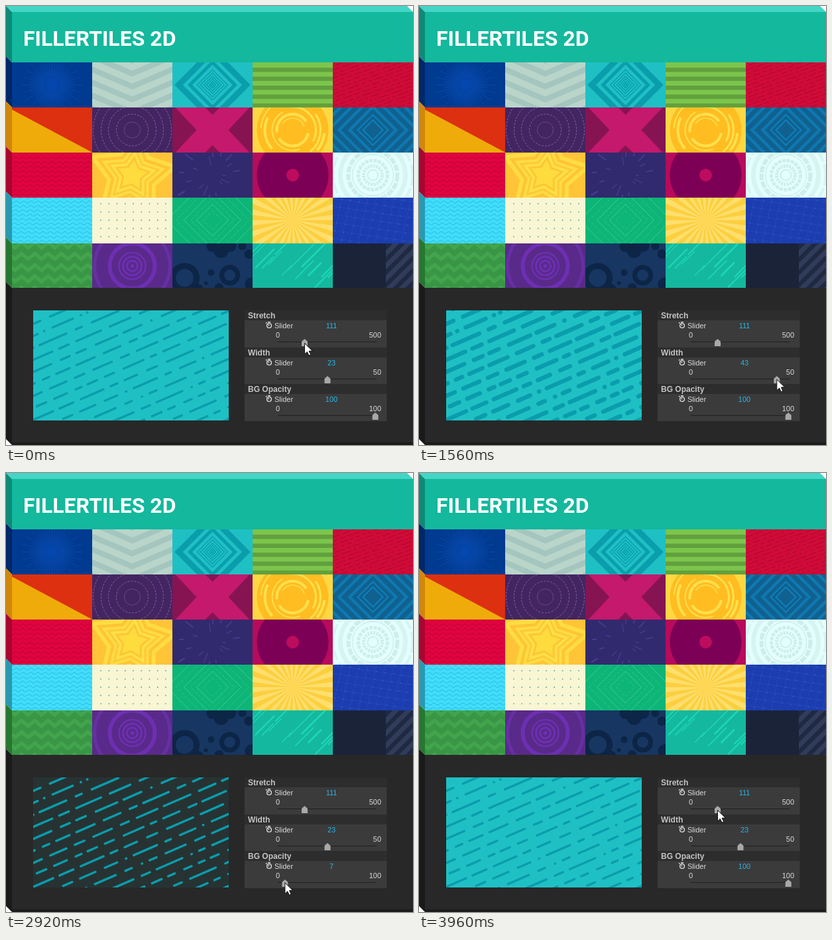
Animation, 614 px wide and 662 px high, one loop 4 s. Source, as an HTML page with a canvas:

```html
<!DOCTYPE html>
<html lang="en">
<head>
<meta charset="utf-8">
<title>Fillertiles 2D</title>
<style>
html, body { margin: 0; width: 100%; height: 100%; overflow: hidden; background: #fff; }
canvas { display: block; }
</style>
</head>
<body>
<canvas id="stage" width="614" height="662"></canvas>
<script>
const W = 614, H = 662, LOOP = 4000, STEP = 40, TAU = Math.PI * 2;
const ctx = document.getElementById('stage').getContext('2d');
const backdrop = document.createElement('canvas');
backdrop.width = W;
backdrop.height = H;
const g = backdrop.getContext('2d');
const SANS = '"Liberation Sans", Arial, sans-serif';

function rng(seed) {
  return () => {
    seed = (seed * 1664525 + 1013904223) >>> 0;
    return seed / 4294967296;
  };
}

// ---------- shape helpers ----------
function poly(c, pts, fill) {
  c.beginPath();
  pts.forEach(p => c.lineTo(p[0], p[1]));
  c.closePath();
  c.fillStyle = fill;
  c.fill();
}
function line(x1, y1, x2, y2, color, w = 1) {
  g.beginPath();
  g.moveTo(x1, y1);
  g.lineTo(x2, y2);
  g.strokeStyle = color;
  g.lineWidth = w;
  g.stroke();
}
function ring(r, w, color, a = 0, b = TAU, dash = []) {
  g.beginPath();
  g.arc(0, 0, r, a, b);
  g.setLineDash(dash);
  g.strokeStyle = color;
  g.lineWidth = w;
  g.stroke();
  g.setLineDash([]);
}
function disc(x, y, r, color) {
  g.beginPath();
  g.arc(x, y, r, 0, TAU);
  g.fillStyle = color;
  g.fill();
}
function diamond(r, w, color, dash = []) {
  g.beginPath();
  g.moveTo(0, -r);
  g.lineTo(r, 0);
  g.lineTo(0, r);
  g.lineTo(-r, 0);
  g.closePath();
  g.setLineDash(dash);
  g.strokeStyle = color;
  g.lineWidth = w;
  g.stroke();
  g.setLineDash([]);
}
function star(r, color) {
  const pts = [];
  for (let i = 0; i < 10; i++) {
    const a = i * TAU / 10 - TAU / 4 + 0.12, d = i % 2 ? r * 0.54 : r;
    pts.push([Math.cos(a) * d, Math.sin(a) * d]);
  }
  poly(g, pts, color);
}
function zigzag(pitch, wave, amp, w, color) {
  g.strokeStyle = color;
  g.lineWidth = w;
  for (let y = -40; y < 46; y += pitch) {
    g.beginPath();
    for (let i = 0, x = -66; x < 70; x += wave / 2, i++) g.lineTo(x, y + (i % 2 ? amp : -amp));
    g.stroke();
  }
}

// ---------- tiles, drawn around their centre ----------
const tiles = [
  ['#003a91', () => {
    const glow = g.createRadialGradient(0, 0, 4, 0, 0, 36);
    glow.addColorStop(0, '#0547ae');
    glow.addColorStop(1, '#003a91');
    g.fillStyle = glow;
    g.fillRect(-61, -34, 122, 68);
    for (let i = 0; i < 48; i++) {
      const a = i * TAU / 48, r = i % 2 ? 34 : 46;
      line(Math.cos(a) * 13, Math.sin(a) * 13, Math.cos(a) * r, Math.sin(a) * r, '#0d4ca8', 0.8);
    }
  }],
  ['#b9d5ca', () => {
    for (let y = -58; y < 50; y += 19.5) {
      poly(g, [[-61, y - 9], [0, y + 17], [61, y - 9], [61, y], [0, y + 26], [-61, y]], '#a5c5bf');
    }
  }],
  ['#1fc0c4', () => {
    diamond(51, 9, '#0a9ead');
    diamond(34, 5, '#0a9ead');
    [23, 18, 13, 9, 5, 2].forEach(r => diamond(r, 1.4, '#0a9ead'));
  }],
  ['#7cc54c', () => {
    g.fillStyle = '#62a03e';
    for (let y = -26; y < 34; y += 13.5) g.fillRect(-61, y, 122, 6.5);
  }],
  ['#d00b37', () => {
    const rand = rng(5);
    for (let y = -34; y < 80; y += 6) {
      for (let x = -66 + rand() * 8; x < 61;) {
        const len = 3 + rand() * 14;
        line(x, y - (x + 61) * 0.35, x + len, y - (x + len + 61) * 0.35, '#ae0a31', 1.1);
        x += len + 4;
      }
    }
  }],
  ['#eeab0a', () => poly(g, [[-61, -34], [61, -34], [61, 34], [-61, -31]], '#dc3010')],
  ['#432562', () => {
    [12, 24, 36, 47, 59].forEach((r, i) => ring(r, 0.9, '#8a68ad', 0, TAU, i ? [3, 2] : [1.5, 1]));
  }],
  ['#c4196d', () => {
    const dark = '#861453';
    [-1, 1].forEach(s => {
      poly(g, [[s * 61, -34], [s * 56, -34], [s * 24, 0], [s * 56, 34], [s * 61, 34]], dark);
      poly(g, [[-11, s * 34], [11, s * 34], [0, s * 23]], dark);
    });
  }],
  ['#fed843', () => {
    disc(0, 0, 54, '#ffbd21');
    const y = '#ffe04d';
    ring(24, 4, y, 0.2, 2.6);
    ring(24, 4, y, 3, 5.7);
    ring(31, 2, y, 1.2, 4.2);
    ring(35, 3, y, 4.6, 6.8);
    ring(42, 4, y, 2.4, 3.6);
    ring(42, 3, y, -0.6, 0.9);
    ring(48, 2, y, 3.2, 4.3);
    ring(48, 4, y, 0.1, 0.7);
    ring(18, 1.5, y, 3.7, 6);
  }],
  ['#10618f', () => {
    [15, 23].forEach(r => diamond(r, 1.8, '#0d82bf'));
    [35, 51, 67, 83].forEach(r => diamond(r, 4.5, '#0f78b0'));
  }],
  ['#e2033f', () => zigzag(7, 11, 2, 1.6, '#cb053c')],
  ['#ffc437', () => {
    ['#ffdd42', '#ffc437', '#ffdd42', '#fec83a', '#ffe045', '#fdc637', '#ffdc3e']
      .forEach((c, i) => star([72, 60, 51, 43, 37, 29, 23][i], c));
  }],
  ['#322a6e', () => {
    const rand = rng(31);
    for (let i = 0; i < 20; i++) {
      const a = i * TAU / 20 + rand() * 0.15, r = 12 + rand() * 38, len = 4 + rand() * 13;
      line(Math.cos(a) * r, Math.sin(a) * r, Math.cos(a) * (r + len), Math.sin(a) * (r + len),
        '#483c92', 0.8 + r / 35);
    }
  }],
  ['#b70b5d', () => {
    disc(0, 0, 54, '#7c0056');
    disc(0, 0, 9.5, '#bd0c5e');
  }],
  ['#e4fffd', () => {
    const c = '#cdeeeb';
    ring(8, 2, c);
    ring(14, 5, c, 0, TAU, [3, 1.4]);
    ring(22, 5, c, 0, TAU, [5, 1.5]);
    ring(31, 1.4, c);
    ring(37, 6, c, 0, TAU, [10, 2]);
    ring(49, 7, '#d6f5f2');
    ring(60, 4, '#d6f5f2', 0, TAU, [16, 4]);
  }],
  ['#42ddfa', () => {
    g.strokeStyle = '#2fc3e8';
    g.lineWidth = 1.2;
    for (let y = -34; y < 40; y += 6.6) {
      g.beginPath();
      for (let x = -62; x < 62; x++) g.lineTo(x, y + Math.sin(x * TAU / 11 + y) * 1.6);
      g.stroke();
    }
  }],
  ['#f8f6d3', () => {
    for (let y = -24.8; y < 30; y += 12.4) {
      for (let x = -47.5; x < 56; x += 12.25) disc(x, y, 0.9, '#5f9e9d');
    }
  }],
  ['#0db577', () => {
    [14, 24, 33, 43, 55, 69].forEach((r, i) => diamond(r, 1, i % 2 ? '#68dca8' : '#2bc68b', i % 2 ? [2, 1.5] : [5, 2]));
  }],
  ['#fccf40', () => {
    for (let i = 0; i < 24; i++) {
      const a = (i + 0.5) * TAU / 24, b = a + TAU / 48;
      poly(g, [[0, 0], [Math.cos(a) * 75, Math.sin(a) * 75], [Math.cos(b) * 75, Math.sin(b) * 75]], '#ffdf6c');
    }
  }],
  ['#1b3db0', () => {
    for (let i = -7; i < 8; i++) {
      line(i * 13 - 10, 36, i * 13 + 6, -36, '#2749ba', 0.7);
      line(-62, i * 12 - 9, 62, i * 12 + 9, '#2749ba', 0.7);
      for (let j = -4; j < 5; j++) disc(i * 13 - j * 2.6, j * 12 + i * 1.9, 0.7, '#4f70d0');
    }
  }],
  ['#42a44d', () => zigzag(17, 20, 4, 8, '#399645')],
  ['#592a89', () => {
    const c = '#6d2fb3';
    disc(0, 0, 3, c);
    ring(8, 3, c);
    ring(14, 3, c);
    ring(20, 2.5, c);
    ring(34, 6, c);
    ring(57, 5, '#6630a3');
  }],
  ['#173662', () => {
    const c = '#0d2546';
    g.save();
    g.translate(-42, 18);
    ring(18, 9, c);
    g.restore();
    g.save();
    g.translate(26, 14);
    ring(12, 7, c);
    g.restore();
    [[0, -30, 9], [13, -23, 11], [26, -31, 10], [-2, 10, 5], [10, 33, 7], [55, -18, 7],
     [45, -30, 6], [-10, 26, 3], [-22, 35, 8], [60, 28, 11]]
      .forEach(b => disc(b[0], b[1], b[2], c));
  }],
  ['#14b89e', () => {
    const rand = rng(14);
    g.lineCap = 'round';
    for (let i = 0; i < 14; i++) {
      const x = -76 + i * 10, y = -20 + rand() * 60, len = 12 + rand() * 34;
      line(x, y, x + len, y - len, '#1cd6b6', 1 + rand() * 2.2);
    }
    g.lineCap = 'butt';
  }],
  ['#1b2338', () => {
    g.fillStyle = '#1f2942';
    g.fillRect(19.5, -34, 42, 68);
    g.save();
    g.beginPath();
    g.rect(19.5, -34, 42, 68);
    g.clip();
    for (let i = 0; i < 7; i++) line(-8, i * 19 - 10, 72, i * 19 - 90, '#303c5a', 7);
    g.restore();
  }]
];

function drawTitle() {
  const text = 'FILLERTILES 2D';
  let size = 44;
  do {
    size--;
    g.font = `700 ${size}px Roboto, "Open Sans", sans-serif`;
    g.fontStretch = 'condensed';
  } while (g.measureText(text).width > 234);
  g.fillStyle = '#fff';
  g.fillText(text, 26, Math.round(48.5 + size * 0.355));
}

function drawBackdrop() {
  const rowTop = i => 85 + Math.round(i * 68.15);
  g.fillStyle = '#fff';
  g.fillRect(0, 0, W, H);
  poly(g, [[0, 0], [605, 0], [614, 9], [9, 9]], '#43d5c6');
  const sides = ['#0d8b78', '#002768', '#d0870a', '#a9052f', '#2799b0', '#26772f', '#1a1a1a'];
  const edges = [9, ...[0, 1, 2, 3, 4].map(rowTop), 425, 662];
  sides.forEach((c, i) => {
    const a = edges[i], b = edges[i + 1];
    poly(g, [[0, a - 9], [9, a], [9, b], [0, b - 9]], c);
  });
  g.fillStyle = '#13b89d';
  g.fillRect(9, 9, 605, 76);
  tiles.forEach(([bg, paint], i) => {
    const x = 9 + (i % 5) * 121, y = rowTop(Math.floor(i / 5));
    g.save();
    g.beginPath();
    g.rect(x, y, 121, 69);
    g.clip();
    g.fillStyle = bg;
    g.fillRect(x, y, 121, 69);
    g.translate(x + 60.5, y + 34);
    paint();
    g.restore();
  });
  g.fillStyle = '#282828';
  g.fillRect(9, 425, 605, 237);
  g.fillStyle = '#1c1c1c';
  g.fillRect(9, 658, 605, 4);
  drawTitle();
}

// ---------- streak preview ----------
const streaks = [];
const rand = rng(77);
for (let row = -14; row <= 14; row++) {
  let x = -300 + rand() * 30;
  while (x < 300) {
    const pick = rand();
    const len = pick < 0.2 ? 0.5 : pick < 0.5 ? 8 + rand() * 8 : 20 + rand() * 24;
    streaks.push([x, x + len, row * 16.6]);
    x += len + 10 + rand() * 7;
  }
}

function drawPreview(s) {
  ctx.save();
  ctx.beginPath();
  ctx.rect(41, 459, 295, 166);
  ctx.clip();
  ctx.globalAlpha = s.opacity / 100;
  ctx.fillStyle = '#1fc0c4';
  ctx.fillRect(41, 459, 295, 166);
  ctx.globalAlpha = 1;
  ctx.translate(188.5, 542);
  ctx.rotate(-0.41);
  ctx.beginPath();
  const k = s.stretch / 111;
  streaks.forEach(([a, b, y]) => {
    ctx.moveTo(a * k, y);
    ctx.lineTo(b * k, y);
  });
  ctx.lineCap = 'round';
  ctx.lineWidth = s.width * 0.15;
  ctx.strokeStyle = '#0a9dad';
  ctx.stroke();
  ctx.restore();
}

// ---------- controls ----------
function label(str, x, y, color, align = 'left', font = '11px ') {
  ctx.font = font + SANS;
  ctx.textAlign = align;
  ctx.fillStyle = color;
  ctx.fillText(str, x, y);
}
function stopwatch(x, y) {
  ctx.strokeStyle = '#ddd';
  ctx.lineWidth = 1.4;
  ctx.beginPath();
  ctx.arc(x, y + 1, 3.4, 0, TAU);
  ctx.moveTo(x, y + 1);
  ctx.lineTo(x - 1.5, y - 0.5);
  ctx.moveTo(x - 2, y - 4.3);
  ctx.lineTo(x + 2, y - 4.3);
  ctx.moveTo(x - 5, y - 2.5);
  ctx.lineTo(x - 3.5, y - 4);
  ctx.stroke();
}
function control(y, name, value, max, knob) {
  ctx.fillStyle = '#2d2d2d';
  ctx.fillRect(360, y, 214.5, 15);
  ctx.fillStyle = '#3b3b3b';
  ctx.fillRect(360, y + 15, 214.5, 41);
  label(name, 365, y + 12, '#c4c4c4', 'left', 'bold 12px ');
  stopwatch(397, y + 22);
  label('Slider', 405, y + 27, '#dcdcdc');
  label(Math.round(value), 491, y + 27, '#28b6ea', 'center');
  label('0', 407, y + 41, '#dcdcdc');
  label(max, 566, y + 41, '#dcdcdc', 'right');
  ctx.fillStyle = '#202020';
  ctx.fillRect(410, y + 47, 149, 1);
  poly(ctx, [[knob, y + 43], [knob + 4.5, y + 47], [knob + 4.5, y + 54],
    [knob - 4.5, y + 54], [knob - 4.5, y + 47]], '#a8a8a8');
}
function pointer(x, y) {
  ctx.save();
  ctx.translate(x, y);
  poly(ctx, [[0, 0], [0, 16.5], [3.8, 12.9], [6.5, 18.5], [9.2, 17.2], [6.6, 11.8], [11.8, 11.6]], '#fff');
  ctx.strokeStyle = '#111';
  ctx.lineWidth = 1;
  ctx.lineJoin = 'round';
  ctx.stroke();
  ctx.restore();
}

// ---------- motion ----------
function ease(t, a, b) {
  const p = Math.min(1, Math.max(0, (t - a) / (b - a)));
  return p * p * (3 - 2 * p);
}
function pulse(t, a, b, c, d) {
  return ease(t, a, b) - ease(t, c, d);
}
const mix = (a, b, p) => a.map((v, i) => v + (b[i] - v) * p);

function stateAt(t) {
  const s = {
    stretch: 111 + 117 * pulse(t, 0, 400, 480, 880),
    width: 23 + 27 * pulse(t, 1320, 1680, 1800, 2200),
    opacity: 100 - 100 * pulse(t, 2560, 2990, 3168, 3520)
  };
  s.knobs = [450.5 + (s.stretch - 111) * 0.322, 485 + (s.width - 23) * 2.74, 410.5 + s.opacity * 1.467];
  const tips = s.knobs.map((x, i) => [x, 508.5 + i * 54.7]);
  let tip = mix(tips[0], tips[1], ease(t, 960, 1240));
  tip = mix(tip, tips[2], ease(t, 2200, 2480));
  s.tip = mix(tip, tips[0], ease(t, 3640, 3960));
  return s;
}

function render(now) {
  const s = stateAt(Math.floor((now % LOOP) / STEP) * STEP);
  ctx.drawImage(backdrop, 0, 0);
  drawPreview(s);
  control(459, 'Stretch', s.stretch, 500, s.knobs[0]);
  control(515, 'Width', s.width, 50, s.knobs[1]);
  control(570, 'BG Opacity', s.opacity, 100, s.knobs[2]);
  pointer(s.tip[0], s.tip[1]);
}

drawBackdrop();
const start = performance.now();
function loop() {
  render(performance.now() - start);
  requestAnimationFrame(loop);
}
render(0);
requestAnimationFrame(loop);
</script>
</body>
</html>
```
